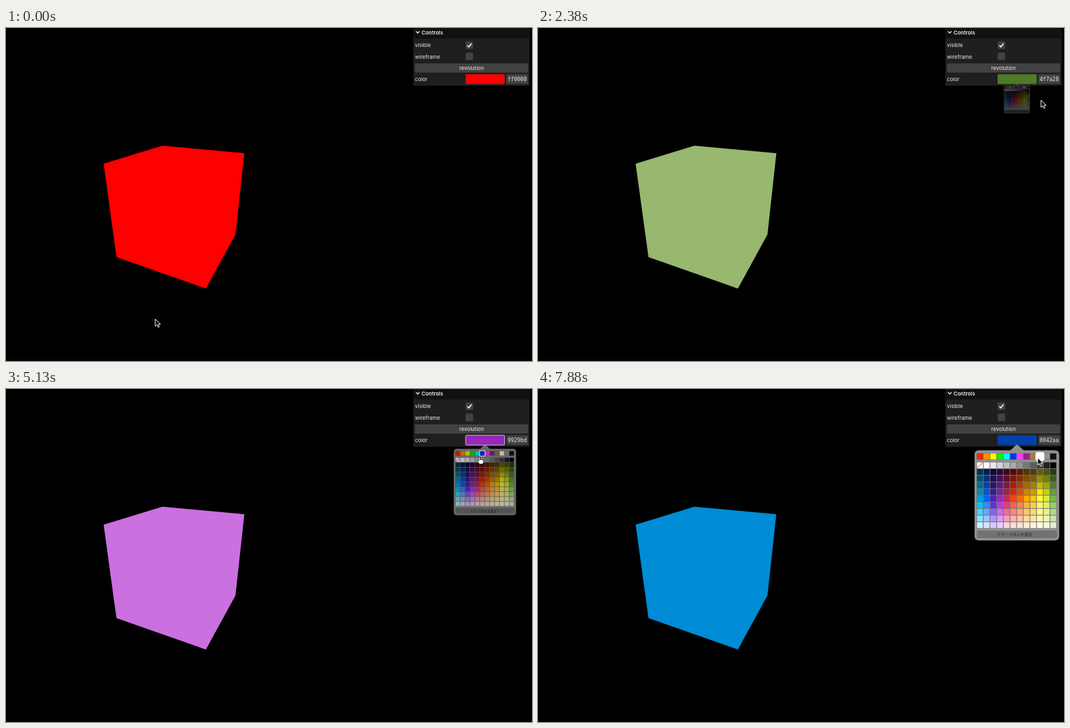
Write an HTML page that moves like this. It is 800 by 508 pixels and loops after 8000 ms.

```html
<!DOCTYPE html>
<html lang="en">
<head>
<meta charset="utf-8">
<title>Cube colour controls</title>
<style>
html, body { margin: 0; width: 100%; height: 100%; overflow: hidden; background: #000; }
svg { display: block; width: 800px; height: 508px; }
text { font: 8px Inter, Roboto, sans-serif; fill: #ebebeb; dominant-baseline: central; }
.title { font-weight: 600; }
.mid { text-anchor: middle; }
.mono { font-family: "DejaVu Sans Mono", "Noto Sans Mono", monospace; }
.jp { font: 6px "Noto Sans CJK JP", "Noto Sans CJK", sans-serif; fill: #222; }
.widget { fill: #424242; }
.cell { stroke: #000; stroke-opacity: .25; stroke-width: .5; }
</style>
</head>
<body>
<svg viewBox="0 0 800 508">
  <rect y="504" width="800" height="4" fill="#080101"/>
  <path id="cube" d="M148.5 207L238 179.5L362.5 191L349 315L304 397.5L168 349.5Z"/>
  <rect x="619.5" width="177" height="88" fill="#1f1f1f"/>
  <rect x="619.5" width="177" height="16" fill="#111"/>
  <path d="M623.5 5L626.2 7.7L628.9 5" fill="none" stroke="#ebebeb" stroke-width="1.4"/>
  <text class="title" x="632" y="6.5">Controls</text>
  <text x="622" y="26">visible</text>
  <text x="622" y="43.5">wireframe</text>
  <text x="622" y="78">color</text>
  <g class="widget">
    <rect x="699" y="20.5" width="11.5" height="11.5" rx="1.5"/>
    <rect x="699" y="37.5" width="11.5" height="11.5" rx="1.5"/>
    <rect x="622" y="54" width="172" height="14" rx="1.5"/>
    <rect x="761" y="70.5" width="33" height="15" rx="1.5"/>
  </g>
  <path d="M701.7 26.5L703.9 28.8L708 23.8" fill="none" stroke="#fff" stroke-width="1.6"/>
  <text class="mid" x="708" y="61">revolution</text>
  <rect id="swatch" x="699" y="70.5" width="59.5" height="15" rx="1.5"/>
  <text id="value" class="mono mid" x="777.5" y="78"></text>
  <g id="popup">
    <path d="M718 94L726.5 86Q728.5 84 730.5 86L739 94Z" fill="#909090"/>
    <rect x="664" y="93.5" width="128.7" height="137.5" rx="6" fill="#909090"/>
    <g id="cells"></g>
    <path d="M668.3 120.3L676 112.7" stroke="#e22" stroke-width="1"/>
    <rect x="667.5" y="216" width="122" height="11.5" rx="2" fill="#727272"/>
    <text class="jp mid" x="728" y="221.7">カラーパネルを表示…</text>
    <rect id="mark" width="11.4" height="11.4" rx="1.5" stroke="#fff" stroke-width="2"/>
  </g>
  <path id="arrow" d="M0 0V11L2.6 8.7L4.3 12.6L6.2 11.8L4.5 8H8Z" stroke="#fff" stroke-width="1"/>
  <path id="hand" d="M-1 1Q0-1 1 1V5Q2 4 3 5Q4 4.3 5 5.3Q6.3 5 6.3 6.5V8.5Q6 10 5 11.5H0Q-1.5 9-3.5 6.8Q-3.5 5.3-1 6.8Z"
    fill="#fff" stroke="#000" stroke-width=".7"/>
</svg>
<script>
const $ = id => document.getElementById(id);
const set = (el, attrs) => { for (const k in attrs) el.setAttribute(k, attrs[k]); };
const rgb = hex => [0, 2, 4].map(i => parseInt(hex.substr(i, 2), 16));
const css = c => `rgb(${c.map(Math.round)})`;
const mix = (a, b, p) => a + (b - a) * p;

// Piecewise linear lookup in rows of [position, ...values]
function track(keys, at) {
  let i = 1;
  while (i < keys.length - 1 && keys[i][0] < at) i++;
  const a = keys[i - 1], b = keys[i];
  const p = Math.max(0, Math.min(1, (at - a[0]) / (b[0] - a[0])));
  return a.slice(1).map((v, j) => mix(v, b[j + 1], p));
}

// Palette: a basic row, a grey row, then hues from dark to light
const basic = 'ff2600 ff9300 fffb00 00f900 00fdff 0433ff ff40ff 942192 aa7942 ffffff 929292 111111';
const greys = 'ffffff ffffff ebebeb d6d6d6 c0c0c0 aaaaaa 929292 797979 5e5e5e 424242 212121 000000';
const stops = [0, 3, 4, 5, 8];
const hues = [
  '00374a 008cb4 00a1d8 01c7fc cbf0ff', '001e57 0056d6 0061fe 3a87fe d3e2ff',
  '11053b 371a94 4d22b2 5e30eb d9c9fe', '2e063d 7a219e 982abc be38f3 efcaff',
  '3c071b 99244f b92d5d e63b7a f9d3e0', '5c0701 e22400 ff4015 fe6250 ffdbd8',
  '5a1c00 da5100 ff6a00 fe8648 ffe2d6', '583300 d38301 ffab01 feb43f ffecd4',
  '563d00 d19d01 fdc700 fecb3e fff2d5', '666100 f5ec00 fefb41 fff76b fefcdd',
  '4f5504 c3d117 d9ec37 e4ef65 f7fadb', '263e0f 669d34 76bb40 96d35f dfeed4'
].map(s => s.split(' ').map((h, i) => [stops[i], ...rgb(h)]));

const STEP = 10.13, SIZE = 9.2, LEFT = 667.6;
const cellX = col => LEFT + col * STEP;
const cellY = row => row ? 111.9 + (row - 1) * STEP : 98.3;
const cellColor = (col, row) => css(
  row > 1 ? track(hues[col], row - 2) : rgb((row ? greys : basic).split(' ')[col]));

for (let row = 0; row < 11; row++) for (let col = 0; col < 12; col++) {
  const r = document.createElementNS('http://www.w3.org/2000/svg', 'rect');
  set(r, { class: 'cell', x: cellX(col), y: cellY(row), width: SIZE, height: SIZE, fill: cellColor(col, row) });
  $('cells').append(r);
}

// Times below count steps of 125 ms
const TICK = 125, STEPS = 64;
const path = [
  [0, 227, 444], [1, 240, 430], [4, 520, 230], [6, 700, 100], [7, 731, 81], [9, 729, 79],
  [11, 738, 105], [13, 766, 149], [15, 780, 152], [17, 784, 148], [19, 765, 110], [21, 735, 80],
  [23, 732, 79], [26, 725, 127], [29, 705, 150], [31, 702, 169], [33, 702, 167], [35, 707, 150],
  [37, 718, 110], [39, 722, 82], [40, 720, 90], [41, 720, 103], [44, 700, 118], [48, 686, 140],
  [52, 683, 149], [53, 682, 149], [55, 705, 110], [57, 728, 80], [59, 730, 79], [61, 748, 95],
  [63, 760, 105]
];
const opens = [8, 23, 40, 58];
const picks = [
  { at: 0, hex: 'ff0000' }, { at: 17, hex: '4f7a28', cell: [11, 4] },
  { at: 33, hex: '9929bd', cell: [3, 6] }, { at: 53, hex: '0042aa', cell: [1, 4] }
];
const hovers = [[7, 10], [21, 24], [39, 52], [57, 60]];
const growth = [.31, .736, .95, 1.012, 1], shrink = [1, .65, .31, 0];

const last = (list, ok) => list.filter(ok).pop();
const toSRGB = v => 255 * (v <= .0031308 ? 12.92 * v : 1.055 * v ** (1 / 2.4) - .055);

function hitCell(x, y) {
  const col = Math.floor((x - LEFT) / STEP);
  const row = y < 110 ? 0 : 1 + Math.floor((y - 111.7) / STEP);
  return y > 97 && row >= 0 && row < 11 && col >= 0 && col < 12 ? [col, row] : null;
}

function draw(k) {
  const [x, y] = track(path, k);
  const pick = last(picks, p => p.at <= k), open = last(opens, o => o <= k);
  const closing = !(open > pick.at);
  const scale = closing
    ? (pick.cell ? shrink[Math.min(k - pick.at, 3)] : 0)
    : growth[Math.min(k - open, 4)];
  const hover = hovers.some(([a, b]) => k >= a && k <= b);

  set($('cube'), { fill: css(rgb(pick.hex).map(v => toSRGB(v / 255))) });
  set($('swatch'), { fill: '#' + pick.hex, stroke: hover ? '#b8b8b8' : 'none' });
  $('value').textContent = pick.hex;

  set($('popup'), {
    transform: `translate(728.5 85) scale(${scale}) translate(-728.5 -85)`,
    opacity: Math.min(1, scale), visibility: scale ? 'visible' : 'hidden'
  });
  const cell = closing ? pick.cell : hitCell(x, y);
  set($('mark'), cell ? {
    x: cellX(cell[0]) - 1.1, y: cellY(cell[1]) - 1.1, fill: cellColor(...cell), display: 'inline'
  } : { display: 'none' });

  for (const id of ['arrow', 'hand'])
    set($(id), { transform: `translate(${x} ${y})`, display: (id === 'hand') === hover ? 'inline' : 'none' });
}

const start = performance.now();
function loop() {
  draw(Math.floor((performance.now() - start) / TICK) % STEPS);
  requestAnimationFrame(loop);
}
loop();
</script>
</body>
</html>
```
